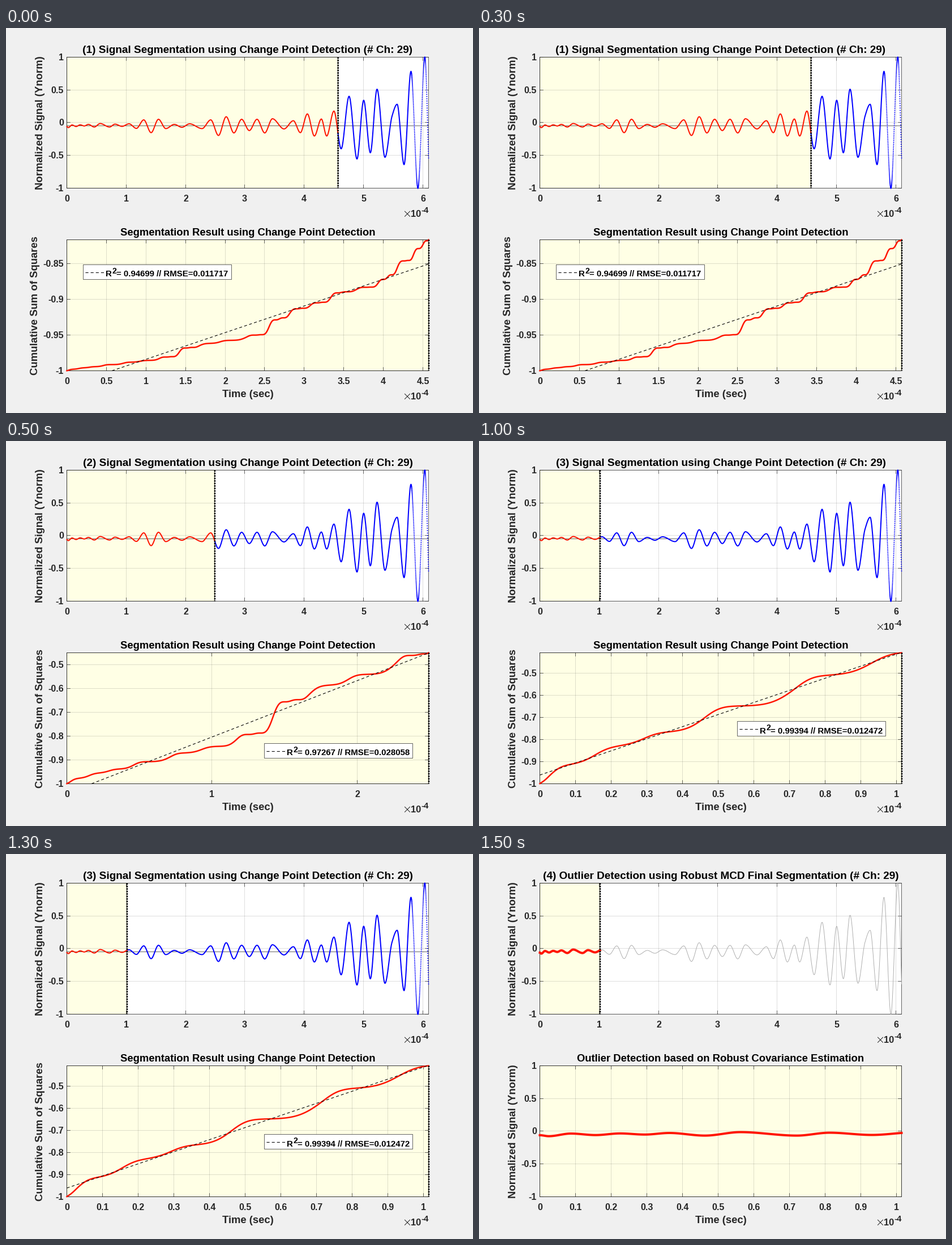
A matplotlib script that plays this animation: 825x679 px, repeating every 2 s.

```python
import numpy as np
import matplotlib.pyplot as plt
from matplotlib.animation import FuncAnimation
from matplotlib.collections import LineCollection
from matplotlib.patches import Rectangle

W, H, DPI = 825, 679, 100
PT = 72 / DPI  # points per pixel
DARK, RED, BLUE, YELLOW = "#262626", "#ff1400", "#0000ff", "#ffffe5"
GRID = (.15, .15, .15, .15)
LEFT, RIGHT, MID = 107, 746, 426.5
TOP_BOX, LOW_BOX = (51, 282), (373, 604)
END = 6.1
CUTS = [4.571, 2.493, 1.0135]
THIN = .7

plt.rcParams.update({"font.family": "Liberation Sans",
                     "path.simplify": False, "path.snap": False})

# The signal swings between these heights; its turns are evenly spaced
# between the few (turn number: time) keys.
HEIGHTS = np.array([
    -.06, -.075, -.035, -.058, -.033, -.05, -.026, -.066, -.013, -.066, -.022, -.056,
    -.017, -.087, .043, -.152, .052, -.09, -.026, -.07, -.017, -.09,
    .043, -.195, .091, -.156, .052, -.12, .052, -.156, .06, -.095,
    .03, -.152, .134, -.203, .056, -.203, .177, -.398, .403, -.554,
    .342, -.459, .511, -.528, .1, .281, -.64, .784, -1, 1, -1.09])
TURN_KEYS = {0: 0, 1: .025, 2: .087, 6: .363, 8: .562, 9: .72, 10: .812, 12: 1.049,
             17: 1.669, 18: 1.812, 20: 2.07, 21: 2.28, 22: 2.427, 30: 3.467,
             31: 3.662, 32: 3.82, 36: 4.292, 37: 4.382, 39: 4.626, 41: 4.893,
             44: 5.231, 45: 5.365, 46: 5.484, 47: 5.57, 51: 6.037, 52: 6.132}
TURNS = np.interp(range(len(HEIGHTS)), list(TURN_KEYS), list(TURN_KEYS.values()))

# x tick step, y tick step, y at panel top, legend corner, legend numbers
RESULTS = [
    (.5, .05, -.8167, (136, 417), "0.94699 // RMSE=0.011717"),
    (1, .1, -.45, (456, 533), "0.97267 // RMSE=0.028058"),
    (.1, .1, -.4077, (456, 494), "0.99394 // RMSE=0.012472"),
]
UNIT_TICKS = np.linspace(-1, 1, 5)


def signal(t):
    """Monotone cubic curve through the turns, flat at each of them."""
    h = np.diff(TURNS)
    s = np.diff(HEIGHTS) / h
    a, b = s[:-1], s[1:]
    same = a * b > 0
    m = np.zeros_like(HEIGHTS)
    m[1:-1][same] = 2 * a[same] * b[same] / (a[same] + b[same])
    i = np.clip(np.searchsorted(TURNS, t) - 1, 0, len(h) - 1)
    u = (t - TURNS[i]) / h[i]
    bend = h[i] * u * (1 - u) * (m[i] * (1 - u) - m[i + 1] * u)
    return HEIGHTS[i] + h[i] * s[i] * u * u * (3 - 2 * u) + bend


fig = plt.figure(figsize=(W / DPI, H / DPI), dpi=DPI, facecolor="#f0f0f0")
ax = fig.add_axes([0, 0, 1, 1])


def text(x, y, s, size, color=DARK, ha="left", angle=0, z=6):
    ax.text(x, y, s, fontsize=size * PT, color=color, ha=ha, va="baseline",
            weight="bold", rotation=angle, rotation_mode="anchor", zorder=z)


def line(x, y, color, width, z=3, **kw):
    ax.plot(x, y, color=color, lw=width * PT, zorder=z, **kw)


def rect(x0, y0, x1, y1, fill, edge="none", z=1):
    ax.add_patch(Rectangle((x0, y0), x1 - x0, y1 - y0, facecolor=fill,
                           edgecolor=edge, lw=THIN * PT, zorder=z))


def dotted(x, box):
    line([x, x], box, "black", 2.6, z=5, ls=(0, (1, .7)), dash_capstyle="butt")


def dashed(x, y, z=3):
    line(x, y, "black", 1.1, z=z, ls=(0, (4.6, 3.7)), dash_capstyle="butt")


def power_label(y):
    for d in (-4.5, 4.5):
        line([704, 713], [y - 5 - d, y - 5 + d], DARK, 1)
    text(714.3, y, "10", 16.5)
    text(732.7, y - 6.8, "-4", 15)


def panel(box, x_end, x_step, y_ticks, y_top, fill_to, title, size, label):
    """Draw a titled empty panel and return its two scales."""
    top, bottom = box

    def sx(t):
        return LEFT + t / x_end * (RIGHT - LEFT)

    def sy(v):
        return bottom - (v + 1) / (y_top + 1) * (bottom - top)

    rect(LEFT, top, RIGHT, bottom, "white")
    rect(LEFT, top, sx(fill_to), bottom, YELLOW, DARK, z=1.1)
    for t in np.arange(0, x_end, x_step):
        x = round(sx(t))
        line([x, x], box, GRID, 1, z=2)
        for y0, y1 in ((top, top + 6), (bottom - 6, bottom)):
            line([x, x], [y0, y1], DARK, THIN, z=2.5)
        text(x, bottom + 23, f"{t:.3g}", 16, ha="center")

    names = [f"{v:.3g}" for v in y_ticks]
    for v, name in zip(y_ticks, names):
        y = round(sy(v))
        line([LEFT, RIGHT], [y, y], GRID, 1, z=2)
        for x0, x1 in ((LEFT, LEFT + 6), (RIGHT - 6, RIGHT)):
            line([x0, x1], [y, y], DARK, THIN, z=2.5)
        text(101.5, y + 5.5, name, 16, ha="right")
    rect(LEFT, top, RIGHT, bottom, "none", DARK, z=2.6)

    # the axis label moves out by one digit when the tick names are longer
    label_x = 64.5 - 9 * (max(map(len, names)) - 4)
    text(label_x, (top + bottom) / 2, label, 18.45, ha="center", angle=90)
    text(MID, top - 7.4, title, size, "black", "center")
    power_label(bottom + 50.3)
    return sx, sy


def signal_panel(step):
    final = step == 3
    cut = CUTS[min(step, 2)]
    name = ("Outlier Detection using Robust MCD Final Segmentation" if final
            else "Signal Segmentation using Change Point Detection")
    sx, sy = panel(TOP_BOX, END, 1, UNIT_TICKS, 1, cut,
                   f"({step + 1}) {name} (# Ch: 29)", 19, "Normalized Signal (Ynorm)")

    t = np.linspace(0, END, 5400)
    x, y = sx(t), sy(signal(t))
    before = t <= cut
    if final:
        line(x[~before], y[~before], "#a8a8a8", .9)
    else:
        line([LEFT, RIGHT], [172, 172], DARK, THIN, z=2.4)
        # samples spread apart where the last swings are steepest
        sparse = x > 716
        solid = ~before & ~sparse
        line(x[solid], y[solid], BLUE, 2)
        dots = [[(a, b), (a + .01, b)] for a, b in zip(x[sparse], y[sparse])]
        ax.add_collection(LineCollection(dots, colors=BLUE, linewidths=2 * PT,
                                         capstyle="round", zorder=3))
    line(x[before], y[before], RED, 4 if final else 2, z=3.5)
    dotted(sx(cut) + .3, TOP_BOX)


def legend(x, y, numbers):
    rect(x, y, x + 262, y + 26, "white", DARK, z=7)
    dashed([x + 4, x + 37], [y + 14, y + 14], z=8)
    text(x + 39.5, y + 21, "R", 15, "black", z=8)
    text(x + 50.5, y + 15.5, "2", 14, "black", z=8)
    text(x + 58.8, y + 21, "= " + numbers, 15, "black", z=8)


def result_panel(step):
    x_step, y_step, y_top, corner, numbers = RESULTS[step]
    end = CUTS[step]
    sx, sy = panel(LOW_BOX, end, x_step, np.arange(-1, y_top, y_step), y_top, end,
                   "Segmentation Result using Change Point Detection", 18.45,
                   "Cumulative Sum of Squares")
    t = np.linspace(0, end, 1300)
    energy = np.cumsum(signal(t) ** 2)
    level = -1 + (y_top + 1) * energy / energy[-1]
    line(sx(t), sy(level), RED, 2.5)

    fit = np.polyval(np.polyfit(t, level, 1), t)
    inside = (fit >= -1) & (fit <= y_top)
    dashed(sx(t[inside]), sy(fit[inside]), z=3.5)
    dotted(RIGHT + .5, LOW_BOX)
    legend(*corner, numbers)


def outlier_panel():
    end = CUTS[2]
    sx, sy = panel(LOW_BOX, end, .1, UNIT_TICKS, 1, end,
                   "Outlier Detection based on Robust Covariance Estimation", 18.45,
                   "Normalized Signal (Ynorm)")
    t = np.linspace(0, end, 1300)
    line(sx(t), sy(signal(t)), RED, 4)


def draw(step):
    ax.clear()
    ax.axis("off")
    signal_panel(step)
    if step < 3:
        result_panel(step)
    else:
        outlier_panel()
    text(MID, 650.5, "Time (sec)", 18.45, ha="center")
    # whole numbers are pixel centres
    ax.set_xlim(-.5, W - .5)
    ax.set_ylim(H - .5, -.5)
    return []


anim = FuncAnimation(fig, draw, frames=4, interval=500, init_func=lambda: [],
                     repeat=True, repeat_delay=0)
plt.show()
```
